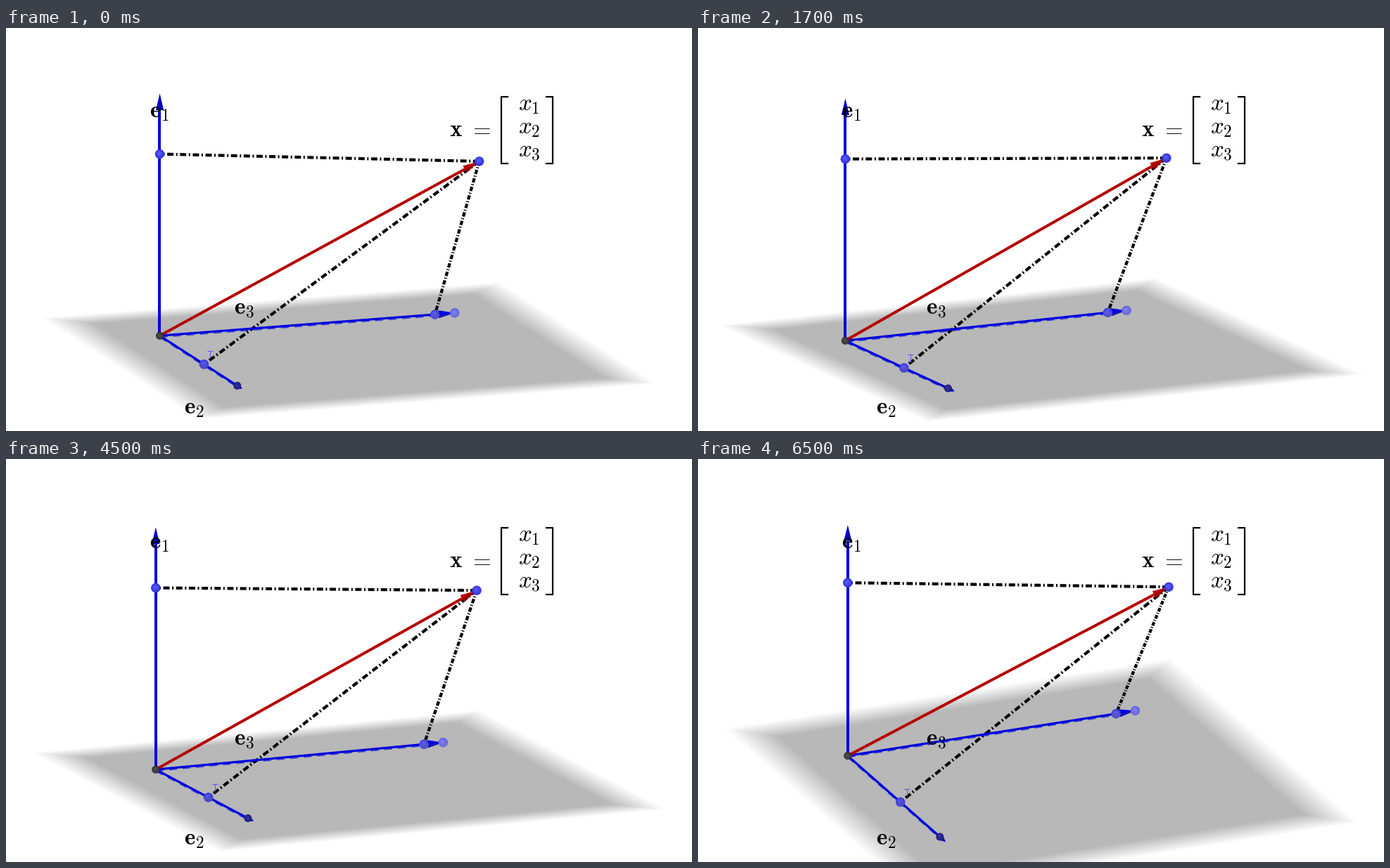
A matplotlib script for the animation above (8 s loop, 975x574 px).

```python
import numpy as np
import matplotlib.pyplot as plt
from matplotlib.animation import FuncAnimation
from matplotlib.colors import to_rgb
from matplotlib.patches import Circle, Polygon, Wedge
from matplotlib.transforms import Affine2D

W, H, DPI = 975, 574, 100
STEP = 500
PX = 72 / DPI
BLUE, RED, GRAY = "#0000dc", "#b40000", "#b8b8b8"
plt.rcParams["mathtext.fontset"] = "cm"

# World lengths of the coordinates of x along e1, e2, e3.
X1, X2, X3 = 265.5, 192.5, 414.0
TIP1, TIP2, TIP3 = 353.7, 1.86 * X2, 1.0714 * X3
CENTER = np.array([177.0, 178.0, 223.6])

# (start ms, azimuth in degrees, sine of elevation)
POSES = [(0, 19.1, .2235), (500, 25.7, .2235), (2500, 28.5, .207),
         (4500, 22.9, .2235), (6500, 22.9, .372)]

fig = plt.figure(figsize=(W / DPI, H / DPI), dpi=DPI, facecolor="white")
ax = fig.add_axes([0, 0, 1, 1])


def camera(azimuth, s):
    """Return a parallel projection from (e1, e2, e3) to pixels."""
    t = np.radians(azimuth)
    c = np.sqrt(1 - s * s)
    m = np.array([[0, np.sin(t), np.cos(t)],
                  [-c, np.cos(t) * s, -np.sin(t) * s]])
    return lambda *p: np.array([488, 287]) + m @ (np.array(p) - CENTER)


def plane_image(n=240):
    u = (np.arange(n) + .5) / n
    edge = np.minimum(u, 1 - u) / .088
    alpha = np.clip(np.minimum(edge[:, None], edge[None, :]), 0, 1)
    rgba = np.empty((n, n, 4))
    rgba[..., :3] = to_rgb(GRAY)
    rgba[..., 3] = alpha
    return rgba


PLANE = plane_image()


def draw_plane(cam):
    a0, a1, b0, b1 = -.85 * X2, 2.69 * X2, -.293 * X3, 1.373 * X3
    o = cam(0, a0, b0)
    u, v = cam(0, a1, b0) - o, cam(0, a0, b1) - o
    skew = Affine2D(np.array([[u[0], v[0], o[0]], [u[1], v[1], o[1]], [0, 0, 1]]))
    image = ax.imshow(PLANE, extent=(0, 1, 0, 1), origin="lower",
                      aspect="auto", interpolation="bilinear", zorder=0)
    image.set_transform(skew + ax.transData)


def line(p, q, color, width, z, **kw):
    kw.setdefault("solid_capstyle", "butt")
    ax.plot([p[0], q[0]], [p[1], q[1]], color=color, lw=width * PX, zorder=z, **kw)


def arrow(cam, end, color, dark, z, width=4, radius=5.5):
    start, tip = cam(0, 0, 0), cam(*end)
    d = tip - start
    head = 24 * d / np.linalg.norm(end)
    n = np.array([-d[1], d[0]]) / np.linalg.norm(d) * radius
    base = tip - head
    line(start, base, color, width, z)
    ax.add_patch(Polygon([tip, base + n, base - n], fc=color, lw=0, zorder=z))
    ax.add_patch(Polygon([tip, base + n, base + n * .2], fc=dark, lw=0, zorder=z))


def under_dashes(p, q):
    """Lower edge of an axis, half hidden by the plane."""
    drop = np.array([0, 2.2])
    line(p + drop, q + drop, "#2f3fd2", 1.6, 2, dashes=(7, 5))


def dash_dot(cam, p, q):
    a, b = cam(*p), cam(*q)
    scale = np.linalg.norm(b - a) / np.linalg.norm(np.subtract(q, p))
    pattern = np.array([9, 3.6, 2, 3.6]) * scale / 4.2
    line(a, b, "black", 4.2, 3, dashes=tuple(pattern), dash_capstyle="butt")


def ball(p, r, dark, light, lower=None):
    dark, light = np.array(to_rgb(dark)), np.array(to_rgb(light))
    for k in np.linspace(0, 1, 5):
        shift = np.array([-.12, -.18]) * r * k
        ax.add_patch(Circle(p + shift, r * (1 - .7 * k), lw=0, zorder=6,
                            fc=dark + (light - dark) * k))
    if lower:
        ax.add_patch(Wedge(p, r, 0, 180, fc=lower, lw=0, alpha=.6, zorder=6))


def tick_mark(p, with_foot):
    x, y = p + [9, -14]
    color = "#5a5aff"
    line((x - 4, y - 5), (x + 4, y - 5), color, 1.1, 7)
    line((x, y - 5), (x, y + 5), color, 1.1, 7)
    if with_foot:
        line((x - 4, y + 5), (x + 1, y + 5), color, 1.1, 7)


def text(x, y, s):
    ax.text(x, y, f"${s}$", fontsize=23.8, color="black",
            ha="left", va="baseline", zorder=9)


def draw_labels():
    for i, (x, y) in enumerate([(204, 127), (253, 549), (324, 407)], 1):
        text(x, y, rf"\mathbf{{e}}_{i}")
    text(630, 154, r"\mathbf{x}")
    text(658, 154, "{=}")
    for i in (1, 2, 3):
        text(728, 84 + 33 * i, f"x_{i}")
    for x, inner in ((704, 713), (777, 768)):
        ax.plot([inner, x, x, inner], [97.5, 97.5, 192.5, 192.5], color="black",
                lw=2.2 * PX, solid_joinstyle="miter", zorder=9)


def update(i):
    _, azimuth, s = [p for p in POSES if p[0] <= i * STEP][-1]
    cam = camera(azimuth, s)
    ax.clear()
    draw_plane(cam)
    ax.set_xlim(0, W)
    ax.set_ylim(H, 0)
    ax.axis("off")

    x = (X1, X2, X3)
    feet = [(X1, 0, 0), (0, X2, 0), (0, 0, X3)]
    origin, p1, p2, p3 = cam(0, 0, 0), *(cam(*f) for f in feet)
    end2, end3 = cam(0, TIP2, 0), cam(0, 0, TIP3)

    under_dashes(origin, origin + .92 * (end2 - origin))
    under_dashes(origin, p3)
    for foot in feet:
        dash_dot(cam, x, foot)
    ball(cam(0, 1.75 * X2, 0), 5.5, "#20207c", "#30309c")
    arrow(cam, (TIP1, 0, 0), BLUE, "#0000a8", 4)
    arrow(cam, (0, TIP2, 0), BLUE, "#0000b4", 4, width=3.2)
    arrow(cam, (0, 0, TIP3), BLUE, "#1414b8", 4, width=3.2)
    arrow(cam, x, RED, "#960000", 5)

    ball(origin, 5.5, "#2c2c2c", "#505050", "#444444")
    ball(p1, 6.7, "#3434d8", "#5656ff")
    ball(cam(*x), 6.7, "#3434d8", "#5656ff")
    ball(p2, 6.7, "#3c3cd4", "#5656f4", "#5050c0")
    ball(p3, 6.7, "#4040d0", "#5a5aec", "#5a5ac4")
    ball(end3, 6.7, "#6060dc", "#8080ff", "#7878d0")
    tick_mark(p2, azimuth > 24)
    draw_labels()
    return []


anim = FuncAnimation(fig, update, frames=16, interval=STEP, init_func=lambda: [],
                     repeat=True, repeat_delay=0, blit=False)
plt.show()
```
